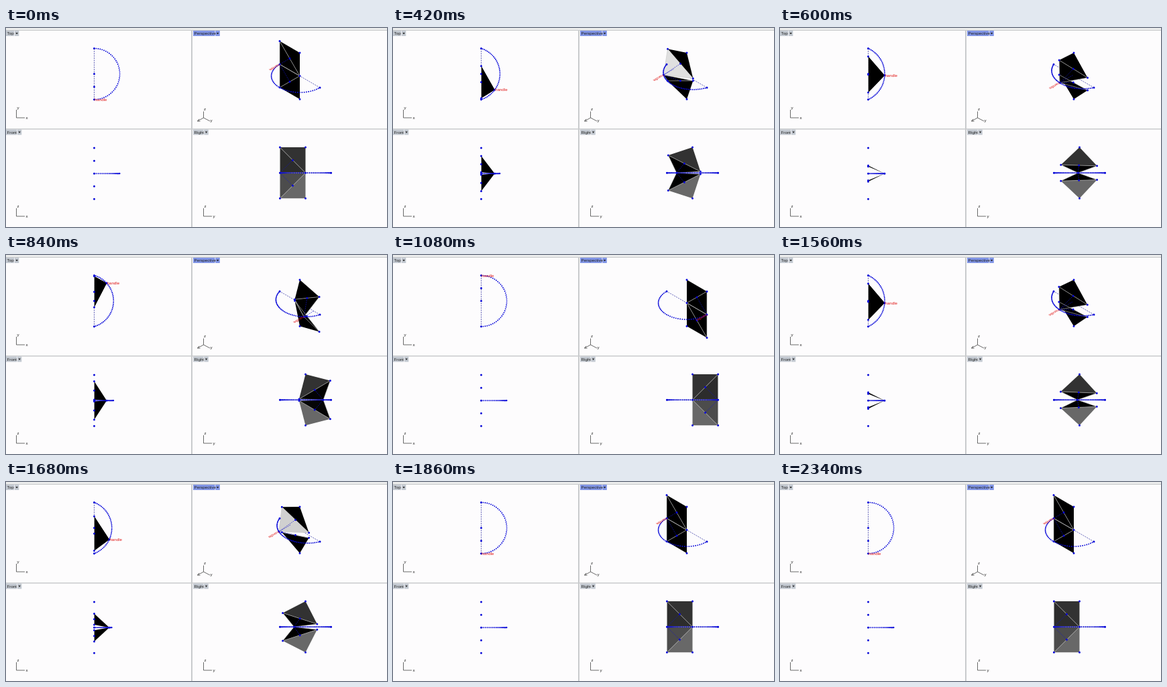
An HTML page for the animation above (2400 ms loop, 568 by 297 pixels).

```html
<!DOCTYPE html>
<html lang="en">
<head>
<meta charset="utf-8">
<title>Folding squares</title>
<style>
html, body { margin: 0; width: 100%; height: 100%; overflow: hidden; background: #fdfcfd; }
svg { display: block; width: 568px; height: 297px; }
text { font-family: "Liberation Sans", Arial, sans-serif; font-size: 6.2px; fill: #222; }
.axis { fill: none; stroke: #444; stroke-width: .8; }
.edge { fill: none; stroke: #c4c4c4; stroke-width: .6; }
.chord { fill: none; stroke: #22229a; stroke-width: .7; stroke-dasharray: 2 1.4; }
.link { fill: none; stroke: #1414c8; stroke-width: .8; stroke-dasharray: 1.5 1.5; }
.arc, .dots { fill: none; stroke: #0808d8; stroke-linecap: round; }
.arc { stroke-width: 1.9; }
.dots { stroke-width: 3; }
.handle { fill: #e01818; font-size: 6.2px; }
</style>
</head>
<body>
<svg id="stage" viewBox="0 0 568 297"></svg>
<script>
const stage = document.getElementById('stage');

function add(tag, attrs, text) {
  const el = document.createElementNS('http://www.w3.org/2000/svg', tag);
  for (const k in attrs) el.setAttribute(k, attrs[k]);
  if (text) el.textContent = text;
  stage.appendChild(el);
  return el;
}
const rect = (x, y, width, height, fill) => add('rect', { x, y, width, height, fill });
const label = (x, y, s) => add('text', { x, y }, s);

function tab(x, y, w, name, color) {
  rect(x, y, w, 8, color);
  rect(x + w + .8, y, 6.5, 8, color);
  label(x + 1.6, y + 6.4, name);
  const ax = x + w + 2.4;
  add('path', { d: `M${ax} ${y + 3}h3.4l-1.7 2.4z`, fill: '#222' });
}

function corner(x, y, across, up) {
  add('path', { class: 'axis', d: `M${x} ${y - 12}V${y}H${x + 12.5}` });
  label(x + 1, y - 13, up);
  label(x + 14, y + 1.5, across);
}

// Window frame
rect(0, 0, 568, 297, '#fdfcfd');
rect(0, 0, 568, 3, '#eceded');
rect(0, 3, 568, 1, '#c6c8ca');
rect(276, 3, 2, 294, '#c9cbcd');
rect(0, 150, 568, 1.5, '#c9cbcd');
tab(0, 4, 12, 'Top', '#c3c9d1');
tab(279, 4, 32.5, 'Perspective', '#8195e6');
tab(0, 151.5, 16, 'Front', '#c3c9d1');
tab(279, 151.5, 15.5, 'Right', '#c3c9d1');
corner(15.5, 134, 'x', 'y');
corner(15.5, 281, 'x', 'z');
corner(294.5, 281, 'y', 'z');
add('path', { class: 'axis', d: 'M294.5 124.5V134L304 139M294.5 134L285.5 139m2.6-3.2l-2.6 3.2l4 .2' });
label(295, 123, 'z');
label(304.5, 140, 'y');

// Projections of [x, y, z]
const U = 38.1;
const views = {
  top: p => [131.5 + U * p[0], 68.6 - U * p[1]],
  front: p => [131.5 + U * p[0], 217.2 - U * p[2]],
  right: p => [446.5 + U * p[1], 216.2 - U * p[2]],
  persp: p => [438 + 30 * (p[1] - p[0]), 71.6 + 17.4 * (p[0] + p[1]) - 34.6 * p[2]]
};

const parts = {};
for (const name in views) {
  const path = cls => add('path', { class: cls });
  parts[name] = {
    chord: path('chord'),
    faces: [0, 1, 2, 3].map(() => path('face')),
    edge: path('edge'),
    link: path('link'),
    arc: path('arc'),
    dots: path('dots')
  };
}
const topLabel = add('text', { class: 'handle' }, 'handle');
const perspLabel = add('text', { class: 'handle' }, 'handle');

const clamp = (v, lo, hi) => Math.min(hi, Math.max(lo, v));
const gray = v => { const n = Math.round(v); return `rgb(${n},${n},${n})`; };
const mid = (a, b) => a.map((v, i) => (v + b[i]) / 2);
const flip = p => [p[0], p[1], -p[2]];

// How squarely a triangle faces the isometric camera
function facing(a, b, c) {
  const u = b.map((v, i) => v - a[i]), w = c.map((v, i) => v - a[i]);
  const n = [u[1] * w[2] - u[2] * w[1], u[2] * w[0] - u[0] * w[2], u[0] * w[1] - u[1] * w[0]];
  return Math.abs(n[0] + n[1] + n[2]) / (Math.hypot(...n) * Math.sqrt(3));
}

// Handle position along y: pulled across, held, pulled back
function handleY(t) {
  return t < 1080 ? clamp(-1 + (t - 300) * .00314, -1, 1)
                  : clamp(1 - (t - 1210) * .00308, -1, 1);
}

function draw(t) {
  const h = handleY(t);
  const k = Math.SQRT2 * Math.sqrt(1 + h * h) - 1;
  const hx = Math.sqrt(Math.max(0, (1 - k * k) / 2));
  const turn = Math.PI / 4 + Math.atan(h * (.5 + .5 * Math.abs(h)));
  const s = Math.sin(turn), c = Math.cos(turn);

  // Upper square: B is pinned, A and E swing about it, H is the handle
  const H = [hx, h, 0], B = [0, 0, 1], A = [0, -c, 1 - s], E = [0, s, 1 - c];
  const C = flip(B), D = flip(A), F = flip(E);
  const P = mid(A, E), Q = flip(P);
  const ends = [[0, 1, 0], [0, -1, 0]];

  // Circle through both chord ends and the handle
  const cx = hx > .02 ? (hx * hx + h * h - 1) / (2 * hx) : 0;
  const r = Math.hypot(1, cx), span = Math.atan2(1, -cx);
  const arc = [];
  for (let i = 0; i <= 40; i++) {
    const a = span * (i / 20 - 1);
    arc.push([cx + r * Math.cos(a), r * Math.sin(a), 0]);
  }

  const flat = clamp((k - .7) / .3, 0, 1);
  const glow = 224 * clamp((facing(A, E, H) - .85) / .08, 0, 1);
  const tones = {
    top: [0, 0, 0, 0],
    front: [0, 0, 0, 0],
    right: [50, 104, 44 * flat, 76 * flat],
    persp: [0, 0, 0, hx > .02 ? glow : 0]
  };
  const upperLast = [[A, B, E], [D, C, F], [D, F, H], [A, E, H]];
  const lowerLast = [[A, B, E], [D, C, F], [A, E, H], [D, F, H]];

  for (const name in views) {
    const at = p => views[name](p).map(v => v.toFixed(2)).join(' ');
    const line = (...ps) => 'M' + ps.map(at).join('L');
    const spots = ps => ps.map(p => `M${at(p)}h.01`).join('');
    const part = parts[name];
    const tris = name === 'persp' ? upperLast : lowerLast;
    const solid = name === 'right' || name === 'persp';

    part.chord.setAttribute('d', line(...ends));
    part.faces.forEach((el, i) => {
      const edgeOn = (!solid && i < 2) || (!solid && hx < .02);
      el.setAttribute('d', edgeOn ? '' : line(...tris[i]) + 'Z');
      el.setAttribute('fill', gray(tones[name][i]));
    });
    part.edge.setAttribute('d', solid
      ? line(A, E, H, A) + line(D, F, H, D)
      : hx > .02 ? line(A, E) + line(D, F) : '');
    part.link.setAttribute('d', solid
      ? line(P, H, Q) + (name === 'persp' ? line(H, [0, h, 0]) : '')
      : '');
    part.arc.setAttribute('d', spots(arc));
    part.dots.setAttribute('d', spots([A, B, C, D, E, F, H, P, Q, ...ends]));
  }

  const [tx, ty] = views.top(H), [px, py] = views.persp(H);
  topLabel.setAttribute('transform', `translate(${tx + .4} ${ty + 2})`);
  perspLabel.setAttribute('transform', `matrix(-.79 .46 -.79 -.46 ${px} ${py}) translate(.4 2)`);
}

const start = performance.now();
function tick() {
  const t = (performance.now() - start) % 2400;
  draw(Math.floor(t / 60) * 60);
  requestAnimationFrame(tick);
}
tick();
</script>
</body>
</html>
```
